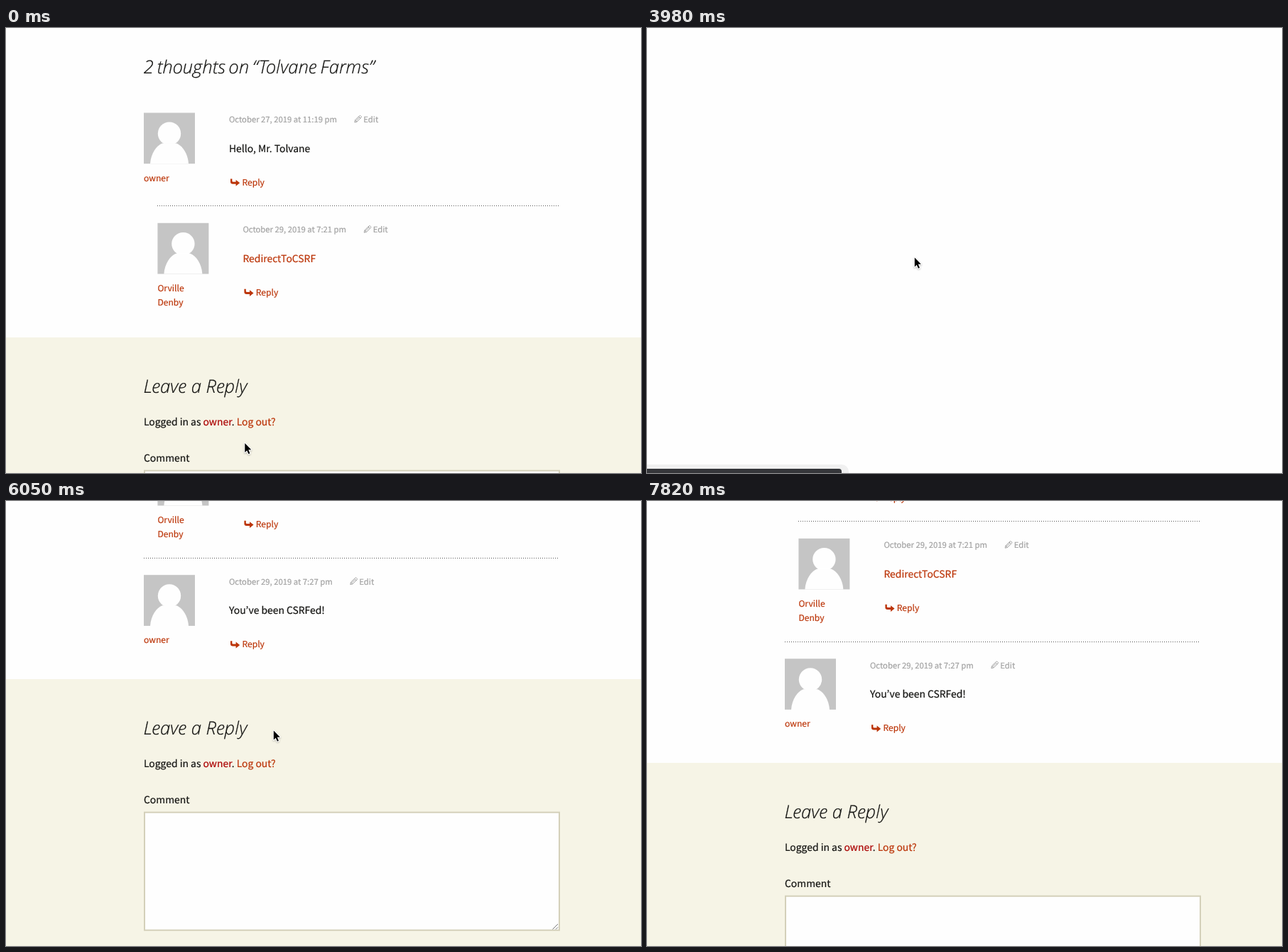
An HTML page that plays this animation: 894x627 px, repeating every 8280 ms.

```html
<!DOCTYPE html>
<html lang="en">
<head>
<meta charset="utf-8">
<title>Comments</title>
<style>
html, body { margin: 0; width: 100%; height: 100%; overflow: hidden; background: #fefefe; }
svg { display: block; position: absolute; left: 0; top: 0; }
text { font-family: "Noto Sans CJK KR", "Noto Sans CJK JP", "Noto Sans CJK SC", "Open Sans", sans-serif;
  color: #141412; text-rendering: geometricPrecision; white-space: pre; }
text, tspan { fill: currentColor; stroke: currentColor; stroke-width: .2; }
.head { font: italic 300 25.7px "Open Sans", "Noto Sans", sans-serif; }
.title { word-spacing: -1.7px; }
.body { font-size: 13.9px; }
.name { font-size: 12.1px; color: #bc360a; }
.meta { font-size: 11.29px; color: #a2a2a2; }
.tags { font-size: 10.42px; color: #686758; }
.code { font: 9.7px "Liberation Mono", monospace; color: #686758; stroke: none; }
.link { color: #bc360a; }
.seen { color: #ac0404; }
.post { color: #fff; }
.hover { color: #ea9629; text-decoration: underline; }
</style>
</head>
<body>
<svg id="stage" width="894" height="627" viewBox="0 0 894 627"></svg>
<script>
const LOOP = 8280;
const RED = '#bc360a', BEIGE = '#f6f4e6';

const esc = s => s.replace(/&/g, '&amp;').replace(/</g, '&lt;').replace(/>/g, '&gt;');
const text = (x, y, cls, s, id = '') =>
  `<text x="${x}" y="${y}" class="${cls}"${id && ` id="${id}"`}>${esc(s)}</text>`;
const rect = (x, y, w, h, fill, more = '') =>
  `<rect x="${x}" y="${y}" width="${w}" height="${h}" fill="${fill}" ${more}/>`;
const at = (x, y, body, id = '') =>
  `<g transform="translate(${x} ${y})"${id && ` id="${id}"`}>${body}</g>`;
const dots = (x, y) =>
  `<path d="M${x} ${y}H778" stroke="#555" stroke-dasharray="1 2"/>`;

const pencil = (x, y, color) => at(x, y,
  `<path d="M.8 10.2 1.6 7 7.6 1Q8.4.3 9.3 1L10.2 1.9Q10.8 2.7 10.1 3.5L4 9.5ZM1.6 7 4 9.5M6.6 2 9.1 4.5M3 7.8 7.6 3.2"
    fill="none" stroke="${color}" stroke-width="1"/>`);

const avatar = (x, y) => at(x, y,
  rect(0, 0, 72, 71.7, '#c5c5c5') +
  `<circle cx="36" cy="29.3" r="16.2" fill="#fefefe"/>
   <path d="M9 71.7C10 57 18 46 26 43H46C54 46 62 57 63 71.7Z" fill="#fefefe"/>`);

const replyIcon = (x, y) => at(x, y,
  `<path d="M0 0H2.4V3Q2.4 4.3 3.8 4.3H7.6V1.4L13.2 5.8 7.6 10.2V7.2H3.2Q0 7.2 0 4.2Z" fill="${RED}"/>`);

// One comment, placed by the top left corner of its avatar.
function comment(x, y, c) {
  return at(x, y,
    avatar(0, 0) +
    c.author.map((s, i) => text(0, 96 + i * 20.3, 'name', s)).join('') +
    text(120, 13.5, 'meta', c.date, c.id && c.id + 'Date') +
    pencil(c.edit, 3.2, '#a2a2a2') + text(c.edit + 13.3, 13.5, 'meta', 'Edit') +
    text(120, 55.2, c.cls || 'body', c.words, c.id && c.id + 'Words') +
    replyIcon(122, 93) + text(138.4, 102, 'name', 'Reply'));
}

const comments =
  text(193.5, 64, 'head title', '2 thoughts on “Tolvane Farms”') +
  comment(194, 119.5, { author: ['owner'], date: 'October 27, 2019 at 11:19 pm', edit: 296, words: 'Hello, Mr. Tolvane' }) +
  dots(213, 250.5) +
  comment(213.4, 274.8, { id: 'second', author: ['Orville', 'Denby'], date: 'October 29, 2019 at 7:21 pm', edit: 290,
    words: 'RedirectToCSRF', cls: 'body link' });

const third = dots(194, 420.5) +
  comment(194, 444.2, { id: 'third', author: ['owner'], date: 'October 29, 2019 at 7:27 pm', edit: 290, words: 'You’ve been CSRFed!' });

const form =
  rect(0, 0, 894, 900, BEIGE) +
  text(193.5, 78, 'head', 'Leave a Reply') +
  `<text x="194" y="124.2" class="body">Logged in as <tspan class="seen">owner</tspan>. <tspan class="link">Log out?</tspan></text>` +
  text(194, 175.2, 'body', 'Comment') +
  rect(195, 187.7, 584, 166, '#fefefe', 'stroke="#d4d0ba" stroke-width="2"') +
  '<path d="M769.5 352.5 777 345M774 352.5 777 349.5" stroke="#777" fill="none"/>' +
  text(194, 391, 'tags', 'You may use these HTML tags and attributes:') +
  '<path d="M285.5 393.5H313" stroke="#686758" stroke-dasharray="1 1"/>' +
  text(415, 391, 'code', '<a href="" title=""> <abbr title=""> <acronym title=""> <b>') +
  text(194, 409, 'code', '<blockquote cite=""> <cite> <code> <del datetime=""> <em> <i> <q cite=""> <s> <strike> <strong>') +
  rect(194, 437, 142, 42, 'url(#button)', 'rx="2"') +
  '<path d="M194 476H336V477Q336 479 334 479H196Q194 479 194 477Z" fill="#b93207"/>' +
  text(217, 463, 'body post', 'Post Comment');

const loading =
  rect(0, 223, 894, 44, BEIGE) +
  `<circle cx="201" cy="380" r="5" fill="none" stroke="${RED}" stroke-width="1.3"/>
   <path d="M200.8 376.6V380.2L203 382.6" fill="none" stroke="${RED}"/>
   <path d="M336.5 384V376.5H340.5L341.5 377.6H345V379H338.6L336.8 384ZM339.2 379.8H346.6L345 384.3H337.2Z" fill="${RED}"/>
   <circle cx="464" cy="377" r="2.3" fill="${RED}"/>
   <path d="M459.6 384.5V382.6Q460 379.9 463 379.9H465Q468 379.9 468.4 382.6V384.5Z" fill="${RED}"/>` +
  pencil(589.5, 374.2, RED);

const arrow = `<path d="M.8 1V14L3.7 11.2 6 16.2 7.9 15.3 5.8 10.3H9.8Z" stroke="#fff" stroke-width="2"
  stroke-linejoin="round" paint-order="stroke" filter="url(#soft)"/>`;
const hand = `<path d="M3.6 2.8C3.2 .9 5.6 .4 6.2 2.2L7.6 6.6C8 5.4 9.8 5.6 10.1 6.8C10.6 5.9 12.1 6.3 12.3 7.5
  C12.9 6.8 14.2 7.4 14.3 8.9L14.4 12.3C14.4 14.6 13.4 15.2 13.3 17.5H6.6C6.2 15.4 3 13.4 1.1 10.6
  C.2 9 2 8 3.3 9.2L5.4 10.8Z" fill="#fff" stroke="#000" stroke-width="1.1" filter="url(#soft)"/>
  <path d="M8.4 11V15M10.4 11V15M12.3 11V15" stroke="#000" stroke-width=".8"/>`;

document.getElementById('stage').innerHTML =
  `<defs>
    <linearGradient id="button" x1="0" y1="0" x2="0" y2="1">
      <stop offset="0" stop-color="#e05d22"/><stop offset="1" stop-color="#d94412"/>
    </linearGradient>
    <filter id="soft" x="-40%" y="-40%" width="200%" height="200%">
      <feDropShadow dx="0" dy="1" stdDeviation="1" flood-opacity=".3"/>
    </filter>
  </defs>` +
  rect(0, 0, 894, 627, '#fefefe') +
  at(0, 0, comments + `<g id="third">${third}</g>` + at(0, 436, form, 'form'), 'page') +
  `<g id="loading">${loading}</g>
   <g id="status">
     <rect id="shade" x="-10" y="615" height="30" rx="10" fill="#000" opacity=".055"/>
     <rect id="bar" x="-10" y="621" height="30" rx="4" fill="#35363a"/>
   </g>` +
  at(0, 0, arrow, 'arrow') + at(0, 0, hand, 'hand');

const el = {};
for (const n of document.querySelectorAll('[id]')) el[n.id] = n;

// Step lists: time, then the values held from then on.
const pointer = [
  [0, 'arrow', 335.5, 584],
  [140, 'arrow', 372, 545], [290, 'arrow', 386, 505], [430, 'arrow', 325, 484],
  [580, 'arrow', 240, 500], [720, 'arrow', 199, 543], [870, 'arrow', 232, 605], [1010, 'arrow', 297, 596],
  [1310, 'arrow', 335, 560], [1460, 'arrow', 420, 475], [1610, 'arrow', 493, 392], [1750, 'arrow', 452, 340],
  [1900, 'hand', 390, 318.5], [2050, 'hand', 383, 320], [2190, 'hand', 376, 322], [2340, 'hand', 372, 323.5],
  [3680, 'arrow', 376, 322.5],
  [7230, 'arrow', 388, 288], [7380, 'hand', 408, 229], [7530, 'arrow', 545, 310],
  [7670, 'arrow', 880, 532], [7820, 'none', 0, 0]
];
const scroll = [
  [0, 0], [4870, 452], [6050, 340], [6200, 248], [6350, 237], [6500, 230],
  [6640, 226], [6790, 224], [6940, 223], [7090, 222]
];
const status = [
  [0, 0, 0], [2490, 55, .4], [2640, 55, .8], [2780, 55, 1], [3680, 274, 1],
  [4870, 274, .6], [5010, 274, .25], [5160, 274, .05], [6050, 274, 0]
];

const held = (list, t) => list.filter(k => k[0] <= t).pop();
const show = (node, on) => node.setAttribute('display', on ? 'inline' : 'none');
const move = (node, x, y) => node.setAttribute('transform', `translate(${x} ${y})`);

function draw(t) {
  const blank = t >= 3980 && t < 4870, after = t >= 4870;
  show(el.page, !blank);
  show(el.loading, t >= 4720 && t < 4870);
  show(el.third, after);
  move(el.page, 0, -held(scroll, t)[1]);
  move(el.form, 0, after ? 591 : 436);

  el.secondWords.setAttribute('class', 'body ' + (t >= 1900 && t < 3980 ? 'hover' : 'link'));
  el.thirdDate.setAttribute('class', 'meta' + (t >= 7380 && t < 7530 ? ' hover' : ''));

  const [, width, alpha] = held(status, t);
  show(el.status, alpha > 0);
  el.status.setAttribute('opacity', alpha);
  el.bar.setAttribute('width', width + 10);
  el.shade.setAttribute('width', width + 20);

  const [, kind, x, y] = held(pointer, t);
  for (const k of ['arrow', 'hand']) {
    show(el[k], k === kind);
    move(el[k], x, y);
  }
}

const start = performance.now();
function tick() {
  draw((performance.now() - start) % LOOP);
  requestAnimationFrame(tick);
}
tick();
</script>
</body>
</html>
```
